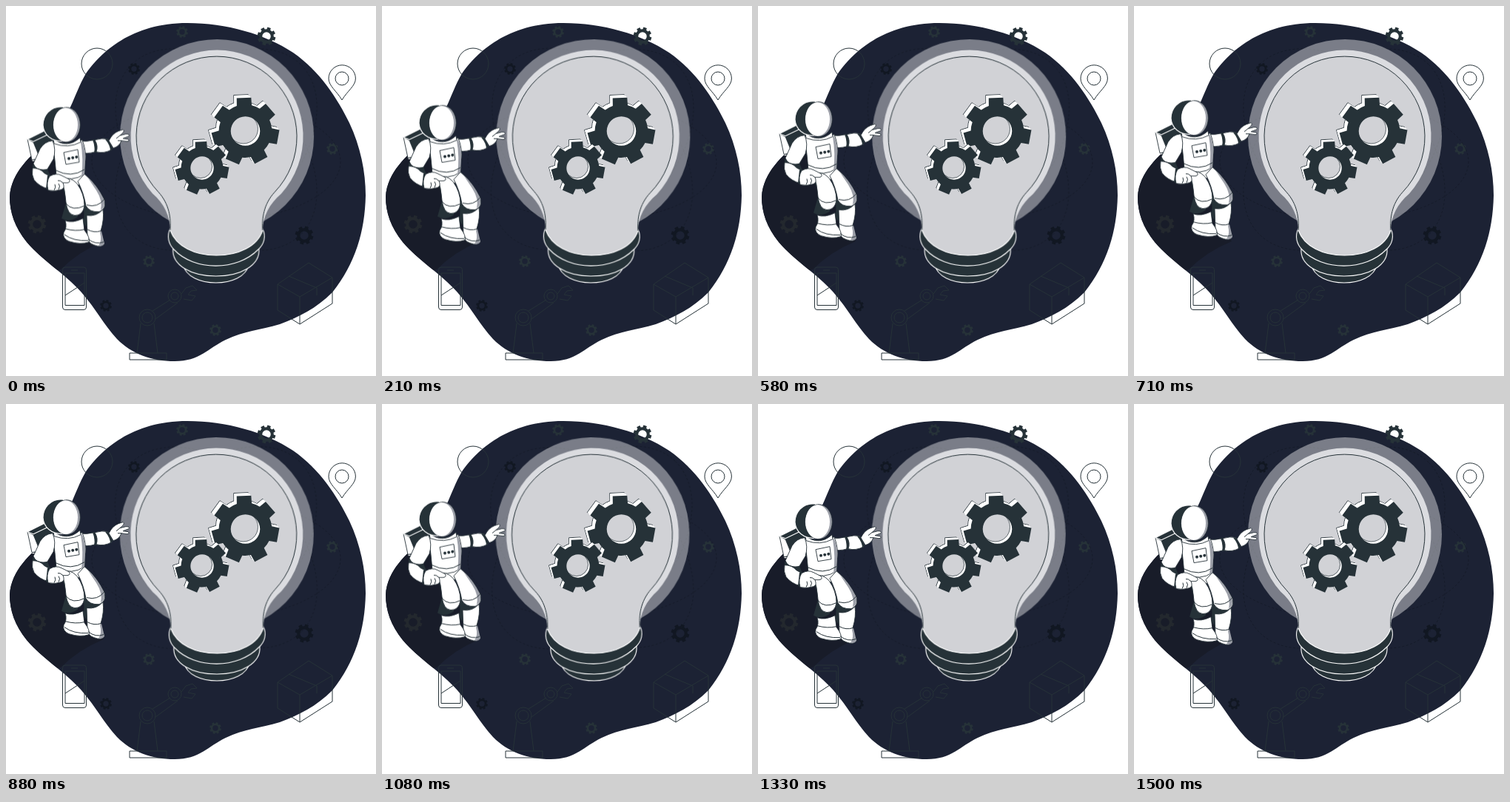
These frames come from a looping animation (500 px wide and 500 px high, 1.54 s). An HTML page:

```html
<!DOCTYPE html>
<html lang="en">
<head>
<meta charset="utf-8">
<title>Astronaut and idea bulb</title>
<style>
  html, body { margin: 0; width: 100%; height: 100%; overflow: hidden; background: #fff; }
  svg { display: block; width: 100%; height: 100%; }
  .line { fill: none; stroke: #263238; stroke-width: 1; }
  .suit { fill: #fff; stroke: #263238; stroke-width: .9; stroke-linejoin: round; }
  .dark { fill: #263238; stroke: #fff; stroke-width: 1.1; stroke-linejoin: round; }
  .ink { fill: #263238; }
  .shade { fill: #9c9fa8; }
  .orbits { fill: none; stroke: #141926; stroke-width: .8; stroke-dasharray: 3 2.5; }
  #bulb { transform-origin: 284px 209px; }
</style>
</head>
<body>
<svg viewBox="0 0 500 500">
  <defs>
    <path id="blob" d="M245 23C298 23 350 38 388 63C424 88 448 125 464 158C479 190 486 224 486 256C485 305 472 348 441 387C419 409 396 420 370 430C343 438 322 439 297 451C272 463 262 480 228 480C196 480 170 470 150 450C131 429 122 410 102 387C78 360 50 345 28 319C12 299 5 279 5 258C7 224 33 203 58 180C86 152 92 119 107 93C128 62 170 23 245 23Z"/>
    <clipPath id="inBlob"><use href="#blob"/></clipPath>
  </defs>

  <use href="#blob" fill="#1c2234"/>
  <path clip-path="url(#inBlob)" fill="#181c29" d="M0 160H62L84 225L132 318Q98 332 74 356L0 380Z"/>

  <g class="line">
    <circle cx="123" cy="78" r="21"/>
    <path d="M454 127C447 115 436 108 436 98A18.200 18.200 0 0 1 472.400 98C472.400 108 461 115 454 127Z"/>
    <circle cx="454" cy="98" r="9"/>
    <rect x="76.500" y="353" width="32" height="57.500" rx="3.500"/>
    <path d="M80 361H106V404.500H80ZM80 391L106 374M88 357H97"/>
    <path d="M367 376L409 347L441 367L397 393ZM367 376V411L397 430L441 402V367M397 393V430M382 365L420 381V391"/>
    <path d="M167 469H217V478H167ZM177 469L182 429M205 469L200 429M198 412L222 397M202 423L232 401M237 389L243 381L252 378L258 384L250 385L246 390L256 392L251 398L240 396"/>
    <circle cx="191" cy="421" r="11"/><circle cx="191" cy="421" r="7"/>
    <circle cx="228" cy="392" r="9"/><circle cx="228" cy="392" r="5"/>
  </g>
  <g id="cogs"></g>

  <g id="bulb">
    <g class="orbits">
      <ellipse cx="284" cy="194" rx="162" ry="104" transform="rotate(45 284 194)"/>
      <ellipse cx="284" cy="194" rx="162" ry="104" transform="rotate(-45 284 194)"/>
      <ellipse cx="284" cy="210" rx="168" ry="80"/>
    </g>
    <circle cx="285" cy="176" r="131" fill="#fff" opacity=".41"/>
    <path fill="#dbdce0" d="M222 303C222 285 214 267 198 253.500A116.500 116.500 0 1 1 372 253.500C356 267 347 285 347 303Z"/>
    <g class="dark">
      <path d="M240 350C246 382 322 382 328 350Z"/>
      <path d="M226 328C224 350 250 365 284 365C318 365 344 350 342 328Z"/>
      <path d="M222 301C217 311 220 322 227 329C255 359 313 358 341 329C349 322 352 311 347 301Z"/>
    </g>
    <path fill="#d1d2d6" d="M222 303C223 287 221 268 206 251.500A108.500 108.500 0 1 1 363 251.500C348 268 346 287 347 303C340 325 314 337 284.500 337C255 337 230 325 222 303Z"/>
    <path class="line" d="M222 303C223 287 221 268 206 251.500A108.500 108.500 0 1 1 363 251.500C348 268 346 287 347 303"/>
    <path fill="none" stroke="#fff" stroke-width="1.100" d="M222 303C230 325 255 337 284.500 337C314 337 340 325 347 303"/>
  </g>
  <g id="wheels"></g>

  <g id="astronaut"><g transform="translate(0 .65)">
    <!-- backpack -->
    <path class="dark" d="M29 180L53 168L66 176L60 208L36 209Z"/>
    <path class="suit" d="M29 180L37 184L46 206L35 208Z"/>
    <path class="dark" d="M29 180L53 168L58 173L37 183Z"/>
    <!-- legs -->
    <path class="ink" d="M73 235L82 262L75 287Q85 293 97 285L90 250Z"/>
    <path class="ink" d="M102 266Q108 278 104 292L112 303L128 280L112 262Z"/>
    <path class="suit" d="M109 283Q122 285 131 275Q133 288 128 304Q131 315 133 321Q129 327 119 323Q110 320 110 311Z"/>
    <path class="shade" d="M129 304L133 321Q130 325 125 324Q130 317 127 306Z"/>
    <path class="suit" d="M80 290Q90 294 104 287L106 303Q114 313 112 319Q101 323 85 318Q76 314 78 306Q83 299 80 290Z"/>
    <path class="line" d="M79 309Q91 318 111 317M80 301Q94 305 106 302M110 302Q119 307 128 304M111 315Q121 323 132 319"/>
    <path class="suit" d="M68 226L106 225L101 239Q95 247 88 240L73 236Z"/>
    <path class="suit" d="M97 237L106 227Q122 240 133 262Q136 274 126 278Q113 279 108 270Q105 252 97 237Z"/>
    <path class="shade" d="M110 231Q124 243 133 263Q134 272 128 276Q131 263 122 249Z"/>
    <path class="suit" d="M75 235Q86 229 96 240Q106 254 106 270Q104 283 93 283Q83 282 81 265Q80 248 75 235Z"/>
    <path class="line" d="M81 267Q90 278 106 270M109 269Q124 273 133 261"/>
    <!-- far arm -->
    <path class="suit" d="M98 182Q109 184 119 181L121 197Q108 201 100 197Z"/>
    <path class="ink" d="M117 181L123 180L124 198L119 198Q121 190 117 181Z"/>
    <path class="suit" d="M120 181Q130 178 138 180L143 194Q132 200 122 197Q125 189 120 181Z"/>
    <path class="ink" d="M134 180L138 180L144 192L141 196Q141 188 134 180Z"/>
    <path class="suit" d="M139 182Q144 172 152 169L158 167Q161 169 157 172L154 175L162 173Q168 173 166 176L158 179L165 180Q168 183 163 183L156 182Q153 190 145 192Z"/>
    <path class="line" d="M154 175L149 179M156 182L151 182"/>
    <!-- torso -->
    <path class="suit" d="M63 183Q82 189 103 181Q109 196 107 210L106 227Q90 239 68 229L66 208Z"/>
    <path class="shade" d="M102 182Q109 196 107 210L106 227L102 230Q105 207 101 184Z"/>
    <path class="line" d="M67 222Q88 233 106 221"/>
    <path class="suit" d="M78 198L97 194L99 211L81 214Z"/>
    <g class="ink"><circle cx="85" cy="206" r="2"/><circle cx="90.200" cy="205" r="2"/><circle cx="95.300" cy="204" r="2"/></g>
    <!-- helmet -->
    <path class="suit" d="M64 179Q82 194 100 178L101 184Q84 193 65 186Z"/>
    <path class="dark" d="M76 136C59 136 50 148 50 161C51 174 61 183 77 183L90 176L91 143Z"/>
    <ellipse class="shade" cx="82" cy="160.500" rx="18.300" ry="23.500" stroke="#263238" stroke-width=".8"/>
    <ellipse cx="80.500" cy="160.500" rx="16.500" ry="22.800" fill="#fff"/>
    <!-- near arm -->
    <path class="suit" d="M63 182Q52 183 46 193L37 213Q41 224 55 222L64 207Q68 194 63 182Z"/>
    <path class="ink" d="M36 214Q44 223 56 220L60 230L50 236Q40 234 36 226Z"/>
    <path class="suit" d="M36 219Q46 219 52 226L61 231L57 247Q45 244 38 235Q34 228 36 219Z"/>
    <path class="ink" d="M56 229L61 229L58 249L54 247Z"/>
    <path class="suit" d="M59 230Q68 225 75 229L85 234Q88 238 83 239L77 239Q80 246 75 248Q66 251 57 249Q54 238 59 230Z"/>
    <path class="line" d="M77 239Q73 235 70 236M71 248Q74 243 71 240M65 249Q68 245 66 241"/>
  </g></g>
</svg>

<script>
const $ = id => document.getElementById(id);

function add(parent, tag, attrs) {
  const el = document.createElementNS('http://www.w3.org/2000/svg', tag);
  for (const key in attrs) el.setAttribute(key, attrs[key]);
  return parent.appendChild(el);
}

// Closed outline of a cog with a round hole
function cogPath(x, y, r, teeth, turn, hole) {
  const body = r * .78;
  const at = (a, d) => `${(x + d * Math.cos(a)).toFixed(2)} ${(y + d * Math.sin(a)).toFixed(2)}`;
  let d = '';
  for (let i = 0; i < teeth; i++) {
    const a = turn + i * 2 * Math.PI / teeth;
    const root = 2 / teeth, tip = 1.5 / teeth;
    d += (i ? `A${body} ${body} 0 0 1 ` : 'M') + at(a - root, body) +
      'L' + at(a - tip, r) + 'L' + at(a + tip, r) + 'L' + at(a + root, body);
  }
  d += `A${body} ${body} 0 0 1 ${at(turn - 2 / teeth, body)}Z`;
  return d + `M${x + hole} ${y}A${hole} ${hole} 0 1 0 ${x - hole} ${y}A${hole} ${hole} 0 1 0 ${x + hole} ${y}Z`;
}

const slate = '#263238', night = '#111722';
const cogs = [
  [238, 35, 8, slate], [173, 85, 8, night], [352, 41, 12.5, slate],
  [441, 193, 8, slate], [42, 295, 12.5, '#23282e'], [403, 310, 12.5, night],
  [193, 345, 8, slate], [135, 405, 8, night], [283, 438, 8, slate]
];
for (const [x, y, r, fill] of cogs)
  add($('cogs'), 'path', { d: cogPath(x, y, r, 8, .3, r * .46), fill, 'fill-rule': 'evenodd' });

// Thick wheel: white sides rising to the upper left, dark face in front
function wheel(x, y, r, depth) {
  const hole = r * .43, g = $('wheels');
  const side = shift => cogPath(x - shift, y - shift, r, 7, .18, hole);
  add(g, 'path', { d: side(depth), class: 'suit' });
  for (let s = depth - .5; s > 0; s -= .5) add(g, 'path', { d: side(s), fill: '#fff' });
  add(g, 'circle', { cx: x, cy: y, r: hole + .5, fill: '#fff' });
  add(g, 'circle', { cx: x - depth * .7, cy: y - depth * .7, r: hole, fill: '#d1d2d6', stroke: slate, 'stroke-width': .7 });
  add(g, 'path', { d: side(0), fill: slate, 'fill-rule': 'evenodd' });
}
wheel(323.5, 169, 46, 4);
wheel(265, 219, 36.5, 3);

const timing = { duration: 1540, delay: -2, iterations: Infinity, easing: 'steps(37)' };
const play = (id, steps, toCss) => $(id).animate(
  steps.map(([offset, value]) => ({ offset, transform: toCss(value) })), timing);

play('astronaut', [[0, -.65], [.4675, -10], [.9675, 0], [1, -.65]], v => `translateY(${v}px)`);
play('bulb', [[0, .13], [.2175, 1], [.7175, -1], [1, .13]], v => `rotate(${v}deg)`);
</script>
</body>
</html>
```
